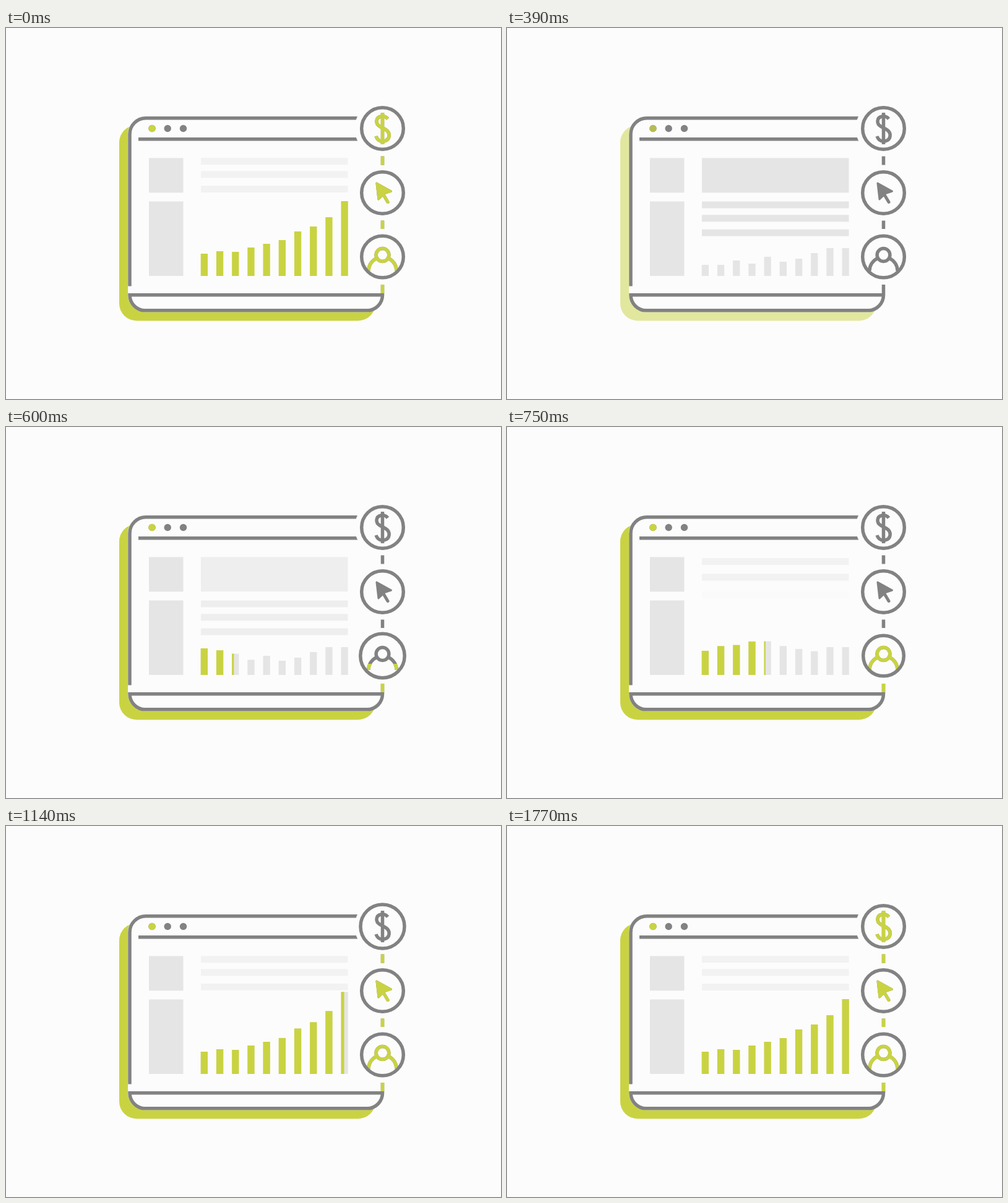
These frames come from a looping animation (800x600 px, 1.8 s). An HTML page with a canvas:

```html
<!DOCTYPE html>
<html>
<head>
<meta charset="utf-8">
<style>
html, body { margin: 0; width: 100%; height: 100%; overflow: hidden; background: #fcfcfc; }
canvas { display: block; }
</style>
</head>
<body>
<canvas id="stage" width="800" height="600"></canvas>
<script>
const c = document.getElementById('stage').getContext('2d');
const LOOP = 1800, BG = '#fcfcfc', GREY = '#828282', GREEN = '#c9d342', BLOCK = '#e5e5e5', PALE = '#f2f2f2';
const STROKE = 5.5, BASE = 401, AXIS = 608.5;
const startTops = [383, 383, 376, 381, 370, 378, 373, 364, 356, 356];
const endTops = [365, 361, 362, 355, 349, 343, 329, 321, 306, 280];
const rings = [[162.5, 1060], [266.5, 800], [370, 580]]; // centre y, pulse start
const dashes = [[207.5, 221.5], [311.5, 325], [415, 429]];
const dollar = new Path2D('M617 147C614 143 609 142 606 143C597 145 597 155 604 159L613 164C622 169 621 181 611 183C604 184 600 181 598 175');
const cursor = new Path2D('M599 251L622.5 264L612 267.5L602 277Z');
const frame = new Path2D('M200 417.5V171.8A26 26 0 0 1 226 145.8H580M214 179.7H580');
const tray = new Path2D('M200 431.7H608.5A25 25 0 0 1 583.5 456.8H225A25 25 0 0 1 200 431.7Z');

const clamp = v => Math.max(0, Math.min(1, v));
const sine = p => Math.sin(clamp(p) * Math.PI / 2);

function box(x, y, w, h, color) {
  c.fillStyle = color;
  c.fillRect(x, y, w, h);
}

function disc(x, y, r, color) {
  c.fillStyle = color;
  c.beginPath();
  c.arc(x, y, r, 0, 7);
  c.fill();
}

function panel(x, y, color) {
  c.fillStyle = color;
  c.beginPath();
  c.roundRect(x, y, 414, 316.5, 28);
  c.fill();
}

function arc(x, y, r, from = 0, to = 360) {
  c.beginPath();
  c.arc(x, y, r, from * Math.PI / 180, to * Math.PI / 180);
  c.stroke();
}

function faded(alpha, draw) {
  if (alpha <= 0) return;
  c.save();
  c.globalAlpha = Math.min(1, alpha);
  draw();
  c.restore();
}

function clipped(x, y, w, h, draw) {
  c.save();
  c.beginPath();
  c.rect(x, y, w, h);
  c.clip();
  draw();
  c.restore();
}

function barTop(i, t) {
  const age = t - 450 - 42 * i, peak = 205 + 6 * i;
  const range = startTops[i] - endTops[i], extra = 8 + range * 0.1;
  if (age <= 0) return startTops[i];
  if (age < peak) return startTops[i] - (range + extra) * sine(age / peak) ** 1.2;
  return endTops[i] - extra * (1 - sine((age - peak) / (200 + 15 * i)));
}

function bars(top, color) {
  for (let i = 0; i < 10; i++) {
    const y = top(i);
    box(314.7 + 25.2 * i, y, 11.3, BASE - y, color);
  }
}

function textLine(y, color) {
  box(315, y, 237.5, 11, color);
}

function icons(color) {
  c.strokeStyle = c.fillStyle = color;
  c.lineWidth = STROKE;
  for (const [y, end] of dashes) c.fillRect(AXIS - STROKE / 2, y, STROKE, end - y);
  c.fillRect(AXIS - STROKE / 2, 137, STROKE, 51);
  c.stroke(dollar);

  arc(AXIS, 367, 10.4);
  arc(AXIS, 393, 22.7, 180, 245);
  arc(AXIS, 393, 22.7, 295, 360);

  c.lineJoin = c.lineCap = 'round';
  c.lineWidth = 3;
  c.fill(cursor);
  c.stroke(cursor);
  c.lineWidth = 5;
  c.beginPath();
  c.moveTo(609, 268);
  c.lineTo(617, 281.5);
  c.stroke();
  c.lineJoin = 'miter';
  c.lineCap = 'butt';
}

function content(t, old) {
  faded(1 - old, () => {
    faded((1 - old) * clamp((680 - t) / 140), () => {
      box(315, 210.3, 237.5, 56, BLOCK);
      for (const y of [280.5, 302.3, 325.6]) textLine(y, BLOCK);
    });
    bars(i => barTop(i, t), BLOCK);
  });
  [210, 231.3, 255].forEach((y, i) => {
    const age = t - 640 - 50 * i;
    const drift = 12 * Math.exp(-age / 140) * Math.cos(Math.PI * age / 290);
    faded(old, () => textLine(y, PALE));
    faded(age / 50, () => textLine(y + drift, PALE));
  });
  faded(old, () => bars(i => endTops[i], GREEN));
  const edge = 417.5 + 0.33 * (t - 750);
  if (edge > 314) clipped(300, 200, edge - 300, 210, () => bars(i => barTop(i, t), GREEN));
}

function draw(t) {
  const old = clamp(1 - t / 240);
  const glow = t < 240 ? old : clamp((t - 240) / 300);
  box(0, 0, 800, 600, BG);
  faded(glow, () => panel(183, 157, GREEN));
  panel(197, 143, BG);

  c.strokeStyle = GREY;
  c.lineWidth = STROKE;
  c.stroke(frame);
  c.stroke(tray);
  for (const x of [236, 261.2, 286.5]) disc(x, 162.5, 5.7, GREY);
  faded(Math.sqrt(glow), () => disc(236, 162.5, 5.7, GREEN));

  box(231, 210.3, 55.5, 56, BLOCK);
  box(231, 280.5, 55.5, 120.5, BLOCK);
  content(t, old);

  for (const [y] of rings) disc(AXIS, y, 45, BG);
  icons(GREY);
  faded(old, () => icons(GREEN));
  const level = 258 - (t < 960 ? 0.348 : 0.305) * (t - 960);
  if (level < 429) clipped(560, level, 100, 440 - level, () => icons(GREEN));

  c.strokeStyle = GREY;
  c.lineWidth = STROKE;
  for (const [y, start] of rings) {
    const age = Math.max(0, t - start);
    arc(AXIS, y, 33.8 + 4.2 * Math.exp(-age / 120) * Math.sin(age * 2 * Math.PI / 230));
  }
}

const origin = performance.now();
function tick() {
  draw((performance.now() - origin) % LOOP);
  requestAnimationFrame(tick);
}
tick();
</script>
</body>
</html>
```
